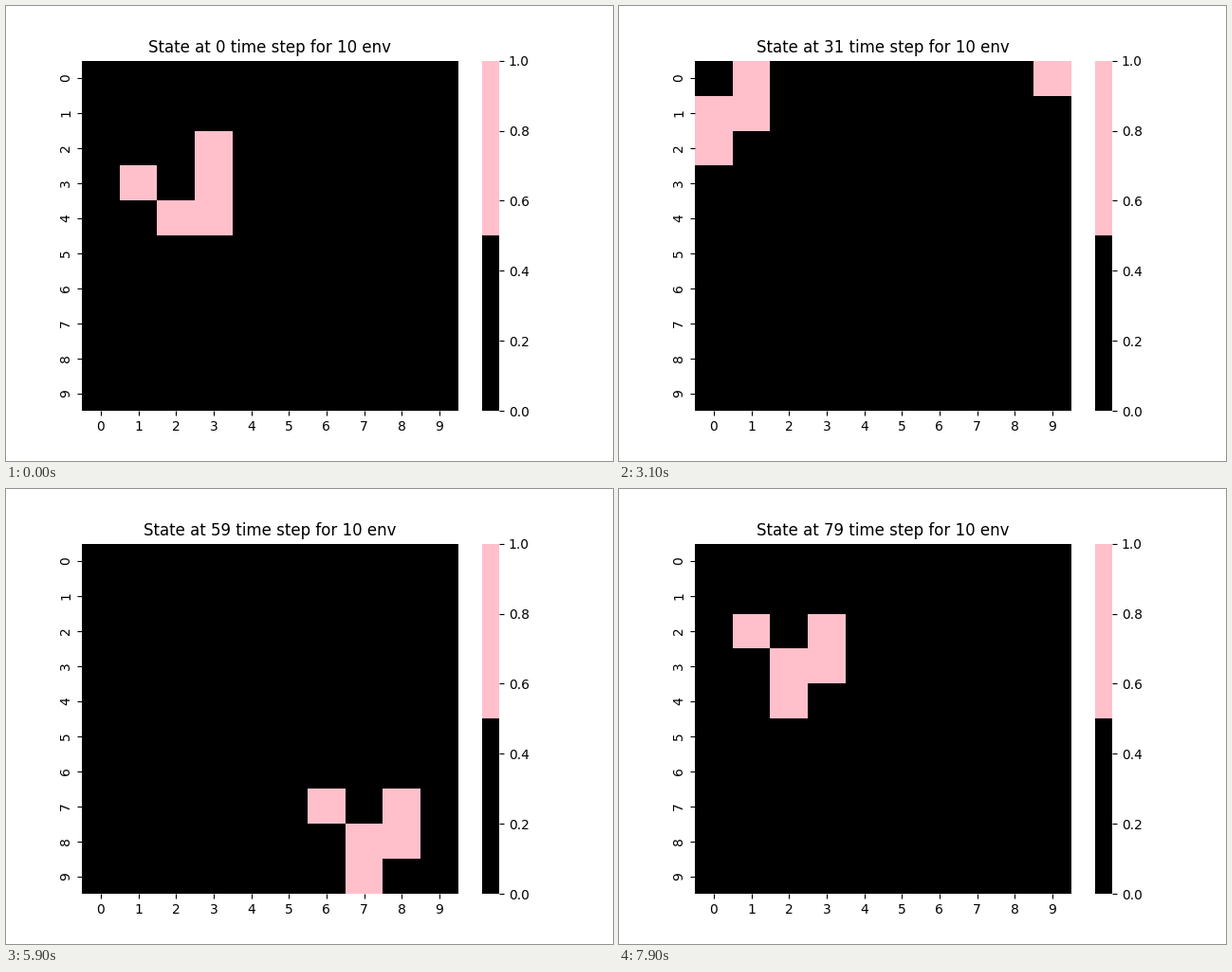
Write a matplotlib script that moves like this. It is 640 by 480 pixels and loops after 8000 ms.

```python
import numpy as np
import matplotlib.pyplot as plt
from matplotlib.animation import FuncAnimation
from matplotlib.colors import ListedColormap

SIZE = 10
STEPS = 80
GLIDER = [(2, 3), (3, 1), (3, 3), (4, 2), (4, 3)]


def life_step(grid):
    """Advance Conway's Game of Life by one step on a torus."""
    shifts = [(r, c) for r in (-1, 0, 1) for c in (-1, 0, 1) if (r, c) != (0, 0)]
    near = sum(np.roll(grid, s, axis=(0, 1)) for s in shifts)
    return ((near == 3) | ((grid == 1) & (near == 2))).astype(int)


start = np.zeros((SIZE, SIZE), int)
start[tuple(zip(*GLIDER))] = 1
states = [start]
while len(states) < STEPS:
    states.append(life_step(states[-1]))

plt.rcParams["font.family"] = "DejaVu Sans"
fig, ax = plt.subplots(figsize=(6.4, 4.8), dpi=100)
mesh = ax.pcolormesh(start, cmap=ListedColormap(["black", "pink"]),
                     vmin=0, vmax=1, linewidth=0, edgecolor="white")
ax.set(xlim=(0, SIZE), ylim=(SIZE, 0))
ax.spines[:].set_visible(False)

bar = fig.colorbar(mesh, ax=ax)
bar.outline.set_linewidth(0)

centers = np.arange(SIZE) + 0.5
ax.set_xticks(centers, range(SIZE))
ax.set_yticks(centers, range(SIZE), rotation="vertical", va="center")
title = ax.set_title("")


def draw(step):
    mesh.set_array(states[step])
    title.set_text(f"State at {step} time step for {SIZE} env")
    return mesh, title


anim = FuncAnimation(fig, draw, frames=STEPS, interval=100, repeat=True,
                     repeat_delay=0)
plt.show()
```
